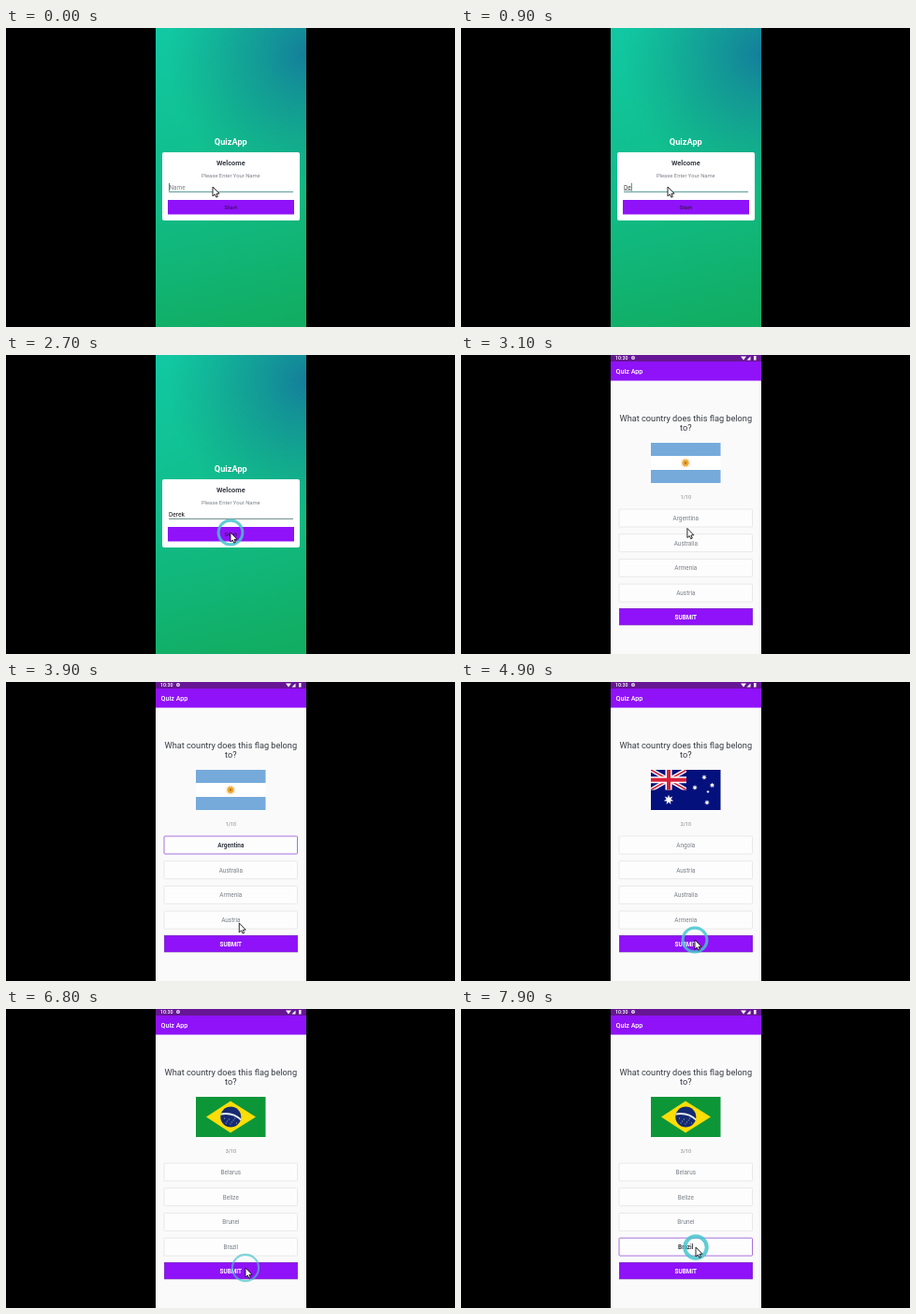
These frames come from a looping animation (480x320 px, 8 s). An HTML page with a canvas:

```html
<!DOCTYPE html>
<html lang="en">
<head>
<meta charset="utf-8">
<title>Flag quiz</title>
<style>
html, body { margin: 0; height: 100%; overflow: hidden; background: #000; }
canvas { display: block; }
</style>
</head>
<body>
<canvas id="stage" width="480" height="320"></canvas>
<script>
const ctx = document.getElementById('stage').getContext('2d');
const LOOP = 8000, LEFT = 160, WIDTH = 161, MID = 240.3;
const PURPLE = '#8f12f8', INK = '#363a43', GREY = '#7a8089', GREEN = '#4caf50';
const PLAYER = 'Derek';
const QUIZ_START = 2900;

// from: first shown, pick: option tapped, check: answer revealed
const questions = [
  { from: QUIZ_START, pick: 3400, check: 4150, answer: 0, flag: argentina,
    options: ['Argentina', 'Australia', 'Armenia', 'Austria'] },
  { from: 4800, pick: 5400, check: 6000, answer: 2, flag: australia,
    options: ['Angola', 'Austria', 'Australia', 'Armenia'] },
  { from: 6700, pick: 7800, check: Infinity, answer: 3, flag: brazil,
    options: ['Belarus', 'Belize', 'Brunei', 'Brazil'] }
];
const clicks = [2500, 3400, 4150, 4700, 5400, 6000, 6500, 7800];
// time, x, y
const path = [
  [0, 221, 170], [2000, 221, 170], [2450, 240, 190], [2950, 240, 190],
  [3350, 246, 176], [3500, 246, 176], [4050, 250, 276], [5000, 250, 276],
  [5350, 250, 230], [5500, 250, 230], [5900, 256, 277], [6900, 256, 277],
  [7600, 251, 255], [8000, 251, 255]
];

function rect(x, y, w, h, fill) {
  ctx.fillStyle = fill;
  ctx.fillRect(x, y, w, h);
}

function box(x, y, w, h, r, fill, stroke) {
  ctx.beginPath();
  ctx.roundRect(x, y, w, h, r);
  ctx.fillStyle = fill;
  ctx.fill();
  if (stroke) outline(stroke, 1);
}

function outline(color, width) {
  ctx.strokeStyle = color;
  ctx.lineWidth = width;
  ctx.stroke();
}

function line(x1, y1, x2, y2, color, width) {
  ctx.beginPath();
  ctx.moveTo(x1, y1);
  ctx.lineTo(x2, y2);
  outline(color, width);
}

function circle(x, y, r, fill) {
  ctx.beginPath();
  ctx.arc(x, y, r, 0, 7);
  if (fill) { ctx.fillStyle = fill; ctx.fill(); }
}

function polygon(points, fill) {
  ctx.beginPath();
  points.forEach(([x, y]) => ctx.lineTo(x, y));
  ctx.closePath();
  ctx.fillStyle = fill;
  ctx.fill();
}

function star(x, y, r, tips, fill) {
  polygon(Array.from({ length: tips * 2 }, (_, i) => {
    const a = i * Math.PI / tips, d = i % 2 ? r * 0.45 : r;
    return [x + d * Math.sin(a), y - d * Math.cos(a)];
  }), fill);
}

function text(s, x, y, size, color, weight = 400, align = 'center') {
  ctx.font = `${weight} ${size}px Roboto, sans-serif`;
  ctx.textAlign = align;
  ctx.fillStyle = color;
  ctx.fillText(s, x, y);
  return ctx.measureText(s).width;
}

function argentina() {
  rect(203, 94, 74.5, 14, '#75aadb');
  rect(203, 108, 74.5, 15, '#fff');
  rect(203, 123, 74.5, 14, '#75aadb');
  star(240, 115.5, 6, 16, '#e9b45a');
  circle(240, 115.5, 3.2, '#eda52e');
  circle(240, 115.5, 1, '#9a6520');
}

function australia() {
  rect(203, 94, 74.5, 43, '#04107c');
  ctx.save();
  ctx.beginPath();
  ctx.rect(203, 94, 38, 21.5);
  ctx.clip();
  [['#fff', 4.5], ['#d8203a', 1.6]].forEach(([color, w]) => {
    line(203, 94, 241, 115.5, color, w);
    line(241, 94, 203, 115.5, color, w);
  });
  [['#fff', 7], ['#d8203a', 4]].forEach(([color, w]) => {
    line(203, 104.7, 241, 104.7, color, w);
    line(222, 94, 222, 116, color, w);
  });
  ctx.restore();
  star(222, 126, 5.5, 7, '#fff');
  [[260, 102, 3], [250, 113, 3], [268.5, 110.5, 3], [263, 129, 3], [264, 117.5, 1.8]]
    .forEach(([x, y, r]) => star(x, y, r, 7, '#fff'));
}

function brazil() {
  rect(203, 94, 74.5, 43, '#0d9638');
  polygon([[214, 115.5], [240, 98.5], [267, 115.5], [240, 132.5]], '#fbdd08');
  circle(240.3, 115.5, 11, '#142a72');
  ctx.save();
  ctx.clip();
  ctx.beginPath();
  ctx.arc(235, 135, 23, 0, 7);
  outline('#e8eef2', 1.8);
  ctx.restore();
  for (let i = 0; i < 9; i++)
    circle(233.5 + i * 1.6, 117 + (i * 5 % 7), 0.5, '#cfd8ea');
}

function drawLogin(t) {
  let g = ctx.createLinearGradient(190, 0, 270, 320);
  g.addColorStop(0, '#11c8a2');
  g.addColorStop(0.5, '#11bd8a');
  g.addColorStop(1, '#11ad62');
  rect(LEFT, 0, WIDTH, 320, g);
  g = ctx.createRadialGradient(322, 28, 0, 322, 28, 150);
  g.addColorStop(0, 'rgba(20,118,156,.9)');
  g.addColorStop(0.5, 'rgba(20,135,145,.5)');
  g.addColorStop(1, 'rgba(20,150,130,0)');
  rect(LEFT, 0, WIDTH, 320, g);

  text('QuizApp', MID, 124.5, 9.2, '#fff', 700);
  box(167, 133, 147, 73, 2, '#fff');
  text('Welcome', MID, 146.5, 7.4, INK, 700);
  text('Please Enter Your Name', MID, 160.3, 5.85, GREY);

  const typing = t < 2300;
  const count = Math.max(0, Math.min(PLAYER.length, Math.floor((t - 300) / 300)));
  const typed = PLAYER.slice(0, count);
  let end = 0;
  if (count) end = text(typed, 174, 172.5, 6.6, typing ? '#444' : '#111', 400, 'left');
  else text('Name', 174.5, 172.5, 6.4, GREY, 400, 'left');
  if (typing) {
    if (count) rect(174, 173.3, end, 0.6, '#666');
    if (t % 1000 < 500 || count && t < 2000) rect(174 + end, 166, 1, 8.5, '#3d8f90');
  }
  rect(174, 174.8, 133, 1, typing ? '#4c9393' : '#648484');

  rect(173, 184, 135, 15.5, PURPLE);
  text('Start', MID, 194, 6.2, '#3a1258', 500);
}

function drawQuiz(t) {
  const q = questions.filter(item => t >= item.from).pop();
  rect(LEFT, 0, WIDTH, 320, '#fafafa');
  rect(LEFT, 0, WIDTH, 7, '#661694');
  rect(LEFT, 7, WIDTH, 20.5, PURPLE);
  text('10:30', 165, 5, 5.3, '#fff', 500, 'left');
  circle(184, 3, 2, '#e8d8f2');
  circle(184, 3, 0.7, '#661694');
  polygon([[299, 1.5], [305, 1.5], [302, 5.5]], '#fff');
  polygon([[305.5, 5.5], [309.5, 5.5], [309.5, 1.5]], '#fff');
  rect(313, 1, 2.5, 4.5, '#fff');
  text('Quiz App', 165.5, 20, 7.2, '#fff', 500, 'left');

  text('What country does this flag belong', MID, 70.5, 9.2, INK);
  text('to?', MID, 81, 9.2, INK);
  q.flag();
  text(`${questions.indexOf(q) + 1}/10`, MID, 154, 5.3, GREY);

  q.options.forEach((name, i) => {
    const picked = i === q.answer && t >= q.pick;
    const right = picked && t >= q.check;
    const y = 165 + i * 26.7;
    box(169, y, 142.5, 19, 1, right ? GREEN : '#fdfdfd',
      right ? GREEN : picked ? '#a673dc' : '#e9e9eb');
    text(name, MID, y + 11.8, 6.4, picked ? INK : GREY, picked ? 700 : 400);
  });
  rect(169, 271, 143, 18.3, '#7c4aa8');
  rect(169.5, 271.5, 142, 17.3, PURPLE);
  text(t >= q.check ? 'GO TO NEXT QUESTION' : 'SUBMIT', MID, 282.6, 6.4, '#fff', 700);
}

function pointerAt(t) {
  const i = path.findIndex(key => key[0] > t);
  const [t0, x0, y0] = path[i - 1], [t1, x1, y1] = path[i];
  const p = (t - t0) / (t1 - t0), e = p * p * (3 - 2 * p);
  return [x0 + (x1 - x0) * e, y0 + (y1 - y0) * e];
}

function drawPointer(t) {
  const [x, y] = pointerAt(t);
  clicks.forEach(start => {
    const p = (t - start) / 420;
    if (p < 0 || p > 1) return;
    circle(x, y, 10.5 + 5 * p);
    ctx.globalAlpha = Math.min(0.85, 2.4 * (1 - p));
    outline('#45c4cc', 5 - 4 * p);
    ctx.globalAlpha = 1;
  });
  polygon([[0, 0], [0, 10], [2.3, 8], [3.8, 11.2], [5.4, 10.5], [4, 7.4], [7, 7.2]]
    .map(([dx, dy]) => [x + dx, y + dy]), '#fff');
  outline('#111', 0.9);
}

function draw(t) {
  rect(0, 0, 480, 320, '#000');
  ctx.save();
  ctx.beginPath();
  ctx.rect(LEFT, 0, WIDTH, 320);
  ctx.clip();
  (t < QUIZ_START ? drawLogin : drawQuiz)(t);
  drawPointer(t);
  ctx.restore();
}

const began = performance.now();
function tick() {
  draw((performance.now() - began) % LOOP);
  requestAnimationFrame(tick);
}
tick();
</script>
</body>
</html>
```
